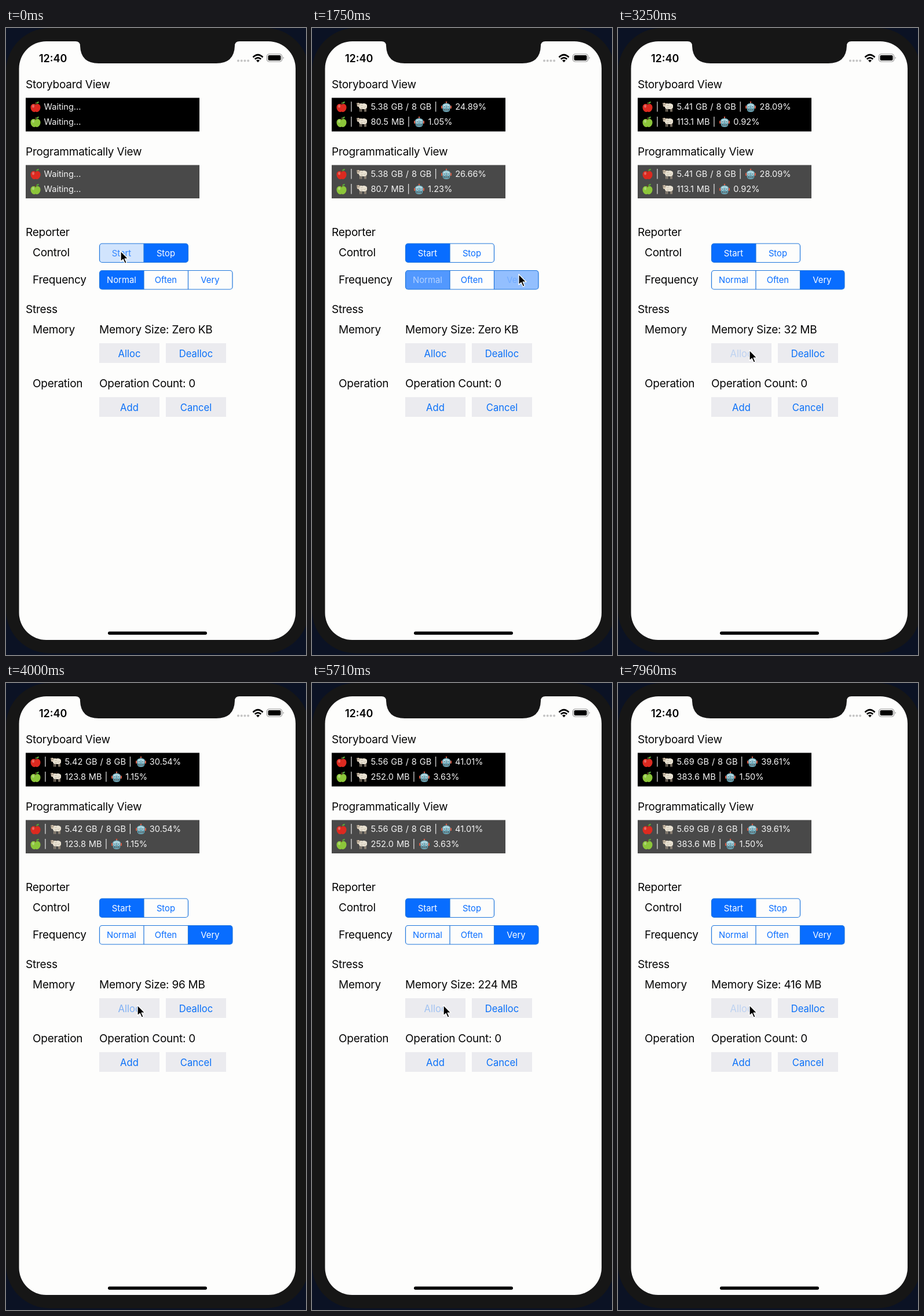
Recreate the animation shown at these times as an HTML page. Size 518 by 1082 pixels, loop 8000 ms.

```html
<!DOCTYPE html>
<html lang="en">
<head>
<meta charset="utf-8">
<title>Resource monitor</title>
<style>
  html, body { margin: 0; width: 100%; height: 100%; overflow: hidden; background: #0b1224; }
  #stage { position: relative; width: 518px; height: 1082px; overflow: hidden; font-family: Inter, Roboto, sans-serif; }
  #stage > svg { position: absolute; inset: 0; }
  .label { font-size: 19px; letter-spacing: -.25px; fill: #050505; }
  .seg { font-size: 14.8px; text-anchor: middle; }
  .btn { font-size: 16.6px; text-anchor: middle; fill: #0a70f8; }
  .line { position: absolute; left: 39.5px; height: 20px; display: flex; align-items: center;
          white-space: pre; font-size: 14.6px; word-spacing: .8px; color: #f4f4f4; }
  .line svg { flex: none; width: 20px; height: 20px; margin: 0 1px; }
</style>
</head>
<body>
<div id="stage">
  <svg width="518" height="1082" viewBox="0 0 518 1082">
    <defs>
      <symbol id="apple" viewBox="0 0 20 20">
        <path d="M10 6C7 4 1.500 5 1.500 11C1.500 15 4.500 19 7.500 19C8.800 19 9.200 18.500 10 18.500S11.300 19 12.500 19C15.500 19 18.500 15 18.500 11C18.500 5 13 4 10 6Z"/>
        <ellipse cx="6" cy="9" rx="2" ry="2.700" fill="#fff" opacity=".3"/>
        <path d="M10 7Q9.500 4 11 2" fill="none" stroke="#6b4527" stroke-width="1.300"/>
        <path d="M11 4.500Q11.500 .8 16 1Q15.500 5 11 4.500Z" fill="#58a63a"/>
      </symbol>
      <symbol id="sheep" viewBox="0 0 20 20">
        <path d="M7 12V18.500M9.500 13V18.500M15 13V18.500M17 12V18.500" stroke="#a89a88" stroke-width="1.400"/>
        <path d="M5 5Q8 3.500 11 4.500Q14 3.500 17 5Q19.500 6 19 9Q19.500 12.500 16.500 13.500Q13 14.500 10 13.500Q6 14.500 5 11Z" fill="#e9e2d3"/>
        <path d="M8 7Q10 9 12 7M13 10Q15 12 17 9M8 11Q10 12 12 11" fill="none" stroke="#bdb3a0" stroke-width=".8"/>
        <ellipse cx="4" cy="6.500" rx="2.400" ry="3.500" fill="#d8c9b4"/>
        <path d="M1 4L3 4.800M7.300 4.300L6 5.200" stroke="#b5a28c" stroke-width="1.500"/>
        <circle cx="3" cy="6" r=".6" fill="#222"/><circle cx="5" cy="6" r=".6" fill="#222"/>
      </symbol>
      <symbol id="robot" viewBox="0 0 20 20">
        <path d="M10 5V2" stroke="#9db0b8" stroke-width="1.400"/>
        <circle cx="10" cy="2" r="1.300" fill="#d45b45"/>
        <rect x="1" y="8" width="3" height="5" rx="1" fill="#d45b45"/>
        <rect x="16" y="8" width="3" height="5" rx="1" fill="#d45b45"/>
        <path d="M3 9Q3 4 10 4T17 9L16 16Q15 19 10 19T4 16Z" fill="#6aa5b5"/>
        <path d="M3.500 8Q5 4.500 10 4.500T16.500 8Z" fill="#a9d3dd"/>
        <circle cx="6.800" cy="10" r="2" fill="#e8fbff"/><circle cx="13.200" cy="10" r="2" fill="#e8fbff"/>
        <circle cx="6.800" cy="10" r="1" fill="#18495c"/><circle cx="13.200" cy="10" r="1" fill="#18495c"/>
        <rect x="5.500" y="14" width="9" height="2.600" rx=".8" fill="#2d4b55"/>
        <path d="M7.700 14V16.500M10 14V16.500M12.300 14V16.500" stroke="#d5e6ea" stroke-width=".8"/>
      </symbol>
    </defs>

    <rect width="523" height="1079" rx="75" fill="#161616"/>
    <rect x="22.500" y="23" width="477.500" height="1033" rx="47" fill="#fdfdfc"/>
    <path d="M120 22V23Q128 23 128 31Q129 61 160 61H363Q394 61 395 31Q395 23 403 23V22Z" fill="#161616"/>
    <rect x="176" y="1041.500" width="171" height="5.500" rx="2.700"/>

    <text x="57" y="58.500" font-size="18" font-weight="600">12:40</text>
    <path d="M401 56.500H420" stroke="#c4c4c4" stroke-width="4" stroke-linecap="round" stroke-dasharray="0.010 5.700"/>
    <path d="M426.500 50.500Q435 42 443.500 50.500M429.700 53.800Q435 48.800 440.300 53.800" fill="none" stroke="#000" stroke-width="2.700"/>
    <path d="M432 56Q435 53.500 438 56L435 59.200Z"/>
    <rect x="450.500" y="45" width="26" height="13" rx="3.800" fill="none" stroke="#8d8d8d" stroke-width="1.200"/>
    <rect x="452.500" y="47" width="22" height="9" rx="2"/>
    <path d="M478.500 49.500Q481 51.500 478.500 53.500Z" fill="#8d8d8d"/>

    <rect x="34" y="120.500" width="300" height="58"/>
    <rect x="34" y="236.500" width="300" height="57.500" fill="#494949"/>
    <g id="ui"></g>
  </svg>
  <div id="lines"></div>
  <svg width="518" height="1082">
    <path id="cursor" d="M0 0V18L4.200 14.200L7.300 21.200L10.200 20L7.200 13.200H13Z" stroke="#fff" stroke-width="1.300" stroke-linejoin="round"/>
  </svg>
</div>
<script>
const LOOP = 8000, BLUE = [8, 109, 255];
const $ = id => document.getElementById(id);
const ui = $('ui');

const clamp = v => Math.max(0, Math.min(1, v));
const fade = (t, from, ms = 200) => clamp((t - from) / ms);
const ease = v => v * v * (3 - 2 * v);

// Interpolates rows of [time, ...values].
function between(rows, t, curve = v => v) {
  const i = rows.findIndex(row => row[0] > t);
  if (i < 0) return rows.at(-1).slice(1);
  const a = rows[i - 1], b = rows[i], k = curve((t - a[0]) / (b[0] - a[0]));
  return a.slice(1).map((v, j) => v + (b[j + 1] - v) * k);
}

function add(tag, attrs, text) {
  const el = document.createElementNS('http://www.w3.org/2000/svg', tag);
  for (const k in attrs) el.setAttribute(k, attrs[k]);
  if (text) el.textContent = text;
  return ui.appendChild(el);
}
const label = (x, y, text) => add('text', { class: 'label', x, y }, text);

label(34, 104, 'Storyboard View');
label(34, 220, 'Programmatically View');
label(34, 359, 'Reporter');
label(46, 394, 'Control');
label(46, 441, 'Frequency');
label(34, 492, 'Stress');
label(46, 527, 'Memory');
label(46, 620, 'Operation');
label(161, 620, 'Operation Count: 0');
const sizeLabel = label(161, 527, 'Memory Size: Zero KB');

function button(x, y, text) {
  add('rect', { x, y, width: 104, height: 34, fill: '#ebebef' });
  return add('text', { class: 'btn', x: x + 52, y: y + 23.5 }, text);
}
const alloc = button(161, 544, 'Alloc');
button(276, 544, 'Dealloc');
button(161, 637, 'Add');
button(276, 637, 'Cancel');

// Returns one setter per segment: 0 = plain, 1 = selected.
function segments(y, names) {
  const x = 161.5, w = 76.5, h = 32.5, total = w * names.length;
  const clip = add('clipPath', { id: 'clip' + y });
  clip.appendChild(add('rect', { x, y, width: total, height: h, rx: 4.5 }));
  const setters = names.map((name, i) => {
    const fill = add('rect', { x: x + i * w, y, width: w, height: h,
      fill: `rgb(${BLUE})`, 'clip-path': `url(#clip${y})` });
    const text = add('text', { class: 'seg', x: x + (i + .5) * w - .3, y: y + 21.7 }, name);
    return v => {
      fill.setAttribute('opacity', v);
      text.setAttribute('fill', `rgb(${BLUE.map(c => Math.round(c + (255 - c) * v))})`);
    };
  });
  const line = { fill: 'none', stroke: '#1f76dc', 'stroke-width': 1.2 };
  add('rect', { x, y, width: total, height: h, rx: 4.5, ...line });
  for (let i = 1; i < names.length; i++) add('path', { d: `M${x + i * w} ${y}v${h}`, ...line });
  return setters;
}
const [start, stop] = segments(372, ['Start', 'Stop']);
const [normal, often, very] = segments(418.5, ['Normal', 'Often', 'Very']);

const icon = (id, fill = '#000') => `<svg fill="${fill}"><use href="#${id}"/></svg>`;
const RED = icon('apple', '#dc2a20'), GREEN = icon('apple', '#8cc63a');
const lines = [126, 151.5, 242, 267.5].map(top => {
  const el = $('lines').appendChild(document.createElement('div'));
  el.className = 'line';
  el.style.top = top + 'px';
  return el;
});

// Key readings: time, system GB, system CPU %, app MB, app CPU %
const FIRST = 740, SLOW = 1050, FAST = 500, FAST_FROM = 2140;
const load = [
  [FIRST, 5.38, 24.89, 80.5, 1.05],
  [FIRST + SLOW, 5.38, 26.66, 80.7, 1.23],
  [2640, 5.38, 27.31, 80.7, 1.1],
  [3140, 5.41, 28.09, 113.1, .92],
  [4640, 5.44, 35.44, 145.3, 1.6],
  [6140, 5.62, 43.8, 305.4, 4.65],
  [7640, 5.69, 39.61, 383.6, 1.5]
];
function sampleTime(t) {
  const [from, step] = t < FAST_FROM ? [FIRST, SLOW] : [FAST_FROM, FAST];
  return from + step * Math.floor((t - from) / step);
}

function setHtml(el, html) {
  if (el.shown !== html) el.innerHTML = el.shown = html;
}
function showPanel(first, t) {
  let top = ' Waiting...', low = top;
  if (t >= FIRST) {
    const [gb, cpu, mb, app] = between(load, sampleTime(t));
    const row = (mem, use) => ` | ${icon('sheep')} ${mem} | ${icon('robot')} ${use.toFixed(2)}%`;
    top = row(gb.toFixed(2) + ' GB / 8 GB', cpu);
    low = row(mb.toFixed(1) + ' MB', app);
  }
  setHtml(lines[first], RED + top);
  setHtml(lines[first + 1], GREEN + low);
}

const path = [[0, 198, 385], [260, 198, 385], [760, 371, 449], [880, 371, 449],
  [1300, 357, 425], [1980, 357, 425], [2500, 227, 556]];
function moveCursor(t) {
  $('cursor').setAttribute('transform', `translate(${between(path, t, ease)})`);
}

// Clicks come slowly at first, then faster; each ends in one more block.
const HELD = .65, PRESSED = .2;
function showAlloc(t) {
  const u = (t - 3250) / 1000;
  const clicks = Math.max(0, 1.75 + 1.72 * u + .178 * u * u);
  const count = Math.floor(clicks), phase = clicks - count;
  const lit = phase > HELD ? 0 : count ? fade(phase, 0, .4) : 1;
  alloc.setAttribute('opacity', PRESSED + (1 - PRESSED) * lit);
  const text = 'Memory Size: ' + (count ? count * 32 + ' MB' : 'Zero KB');
  if (sizeLabel.textContent !== text) sizeLabel.textContent = text;
}

const LEAD = 50;  // the second panel refreshes a little earlier
function draw(t) {
  const on = fade(t, 90), switched = fade(t, 1690);
  start(.18 + .82 * on);
  stop(1 - on);
  normal(1 - switched);
  often(0);
  very(t < 1560 ? 0 : .18 + .82 * switched);
  showPanel(0, t);
  showPanel(2, t + LEAD);
  showAlloc(t);
  moveCursor(t);
}

const origin = performance.now();
function tick() {
  draw((performance.now() - origin) % LOOP);
  requestAnimationFrame(tick);
}
tick();
</script>
</body>
</html>
```
